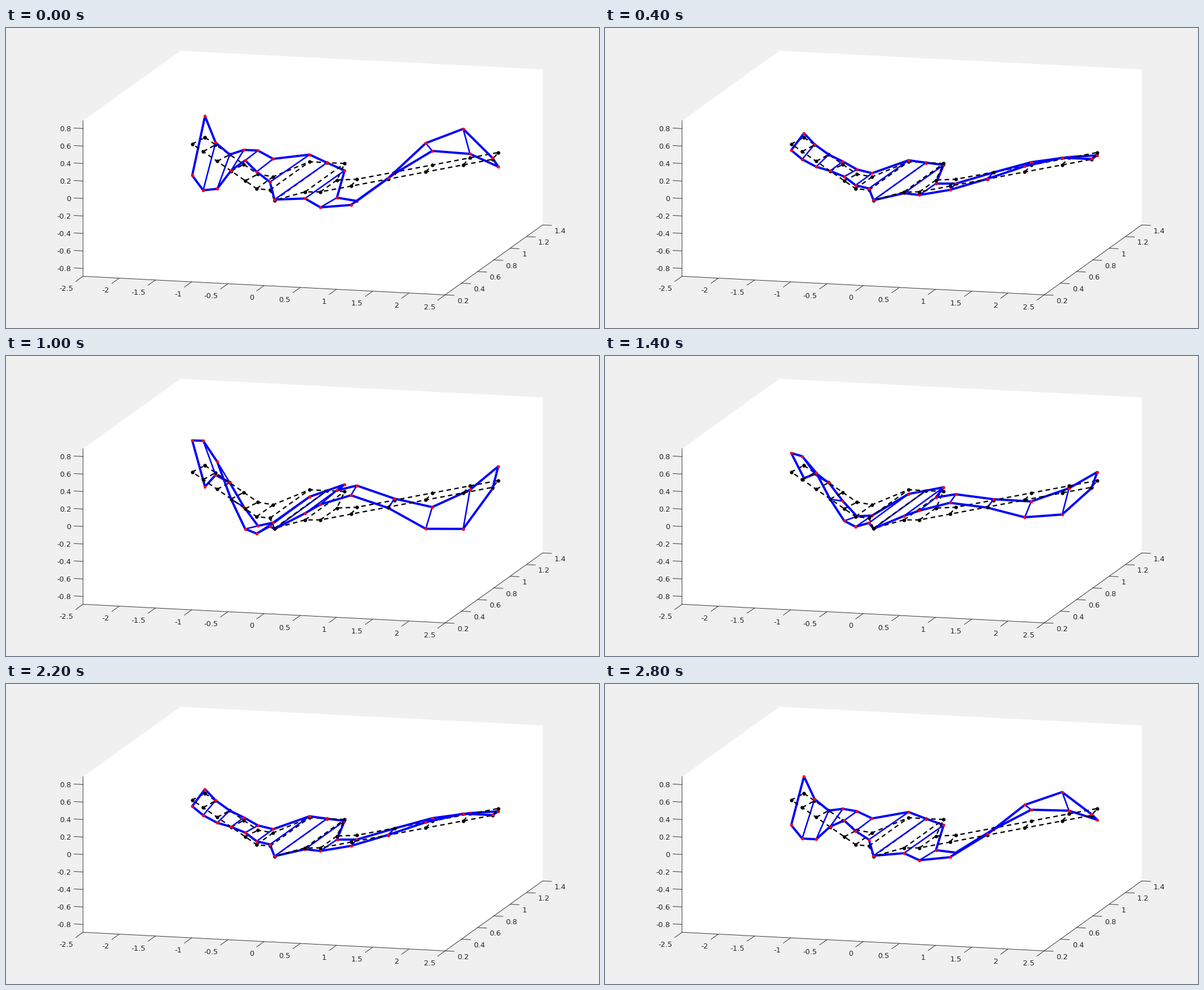
A matplotlib script for the animation above (3000 ms loop, 1053 px wide and 532 px high).

```python
import numpy as np
import matplotlib.pyplot as plt
from matplotlib.animation import FuncAnimation

W, H = 1053, 532
FRAMES, INTERVAL = 15, 200
INK = (0.15, 0.15, 0.15)
BLUE, RED = (0, 0, 1), (1, 0, 0)
BOLD, THIN, DASHED = 4.0, 2.6, 2.3
REST_Z, ABOVE = 10, 20
X_MAX, Y_MIN, Y_MAX, Z_MAX = 2.5, 0.2, 1.4, 0.89

plt.rcParams["font.family"] = "DejaVu Sans"
fig = plt.figure(figsize=(W / 72, H / 72), dpi=72, facecolor="#f0f0f0")
ax = fig.add_axes([0, 0, 1, 1])
ax.set_xlim(0, W)
ax.set_ylim(H, 0)
ax.axis("off")


def project(x, y, z=0):
    """Parallel projection of a world point to stage pixels."""
    u, v = x + X_MAX, y - Y_MIN
    return 136.8 + 128.6 * u + 144.2 * v, 302.3 + 6.6 * u - 103.3 * v - 155 * z


def draw_box():
    """White box, three axes, ticks and labels."""
    low, high = -Z_MAX, Z_MAX
    left_top, left_low = (-X_MAX, Y_MIN, high), (-X_MAX, Y_MIN, low)
    right_low, back_low = (X_MAX, Y_MIN, low), (X_MAX, Y_MAX, low)
    outline = [left_top, (-X_MAX, Y_MAX, high), (X_MAX, Y_MAX, high),
               back_low, right_low, left_low]
    ax.fill(*zip(*(project(*p) for p in outline)), color="white", lw=0, zorder=-5)
    edge = [left_top, left_low, right_low, back_low]
    ax.plot(*zip(*(project(*p) for p in edge)), color=INK, lw=0.9, zorder=-4)

    def tick(point, value, step, shift, ha):
        x, y = project(*point)
        ax.plot([x, x + step[0]], [y, y + step[1]], color=INK, lw=0.9, zorder=-4)
        ax.text(x + shift[0], y + shift[1], f"{round(value, 1) + 0:g}", ha=ha,
                va="center_baseline", size=13, color=INK, zorder=-4)

    for z in np.linspace(-0.8, 0.8, 9):
        tick((-X_MAX, Y_MIN, z), z, (-16, -0.8), (-21, -0.4), "right")
    for x in np.linspace(-X_MAX, X_MAX, 11):
        tick((x, Y_MIN, low), x, (-13, 9.3), (-17.5, 20.7), "right")
    for y in np.linspace(Y_MIN, Y_MAX, 7):
        tick((X_MAX, y, low), y, (16, 0.8), (21, 9.5), "left")


def swept_row(first, pitch, tip, sweep, body, bend, skew):
    """Nodes along one wing edge, left to right, as (screen x, screen y, drop).

    Half a span is given: the body, four evenly spaced ribs and the tip.
    The bend is mirrored with opposite sign; skew adds the uneven part.
    """
    x = np.array([0, 0.242, 0.44, *(first + pitch * np.arange(4)), tip])
    y = sweep + 0.406 * x
    y[:len(body)] = body
    drop = np.array(bend)

    def mirror(half, sign=1):
        return np.concatenate([sign * half[:0:-1], half])

    even = skew(mirror(x) / tip)
    full_x, full_y = mirror(x, -1), mirror(y)
    return np.column_stack([*project(full_x, full_y), mirror(drop, -1) + even])


NEAR = swept_row(0.73, 0.355, 2.073, 0.322, [0.328, 0.488],
                 [0, 13, 28.7, 34.7, -0.4, -50, -66.3, -29.2],
                 lambda r: 28 * r ** 14 - 1.3)
FAR = swept_row(0.682, 0.358, 2.025, 0.456, [0.974, 0.976, 0.7045],
                [0, 12.5, 31.5, 40.2, 14.2, -12.5, -1.6, 31.4],
                lambda r: -6.2 * r ** 3 - 13.5 * np.exp(-((r - 0.6) / 0.178) ** 2))


def draw_rest():
    """Undeformed wing, dashed."""
    style = dict(color="black", lw=DASHED, ls=(0, (8 / DASHED, 6 / DASHED)),
                 dash_capstyle="butt", zorder=REST_Z)
    loop = np.vstack([FAR, NEAR[::-1], FAR[:1]])
    ax.plot(loop[:, 0], loop[:, 1], **style)
    for p, q in zip(NEAR[1:-1], FAR[1:-1]):
        ax.plot([p[0], q[0]], [p[1], q[1]], **style)
    ax.plot(loop[:, 0], loop[:, 1], "o", color="black", ms=6.4, mew=0,
            zorder=REST_Z + 1)


moving = []  # (artist, resting y, drop, layer)


def add_dot(node, layer):
    art, = ax.plot(node[:1], node[1:2], "o", color=RED, ms=5.4, mew=0)
    moving.append((art, node[1:2], node[2:], layer))


def add_edge(p, q, width, layer):
    """Split an edge where its drop changes sign, so each part stays on one side of the rest plane."""
    pts = [p, q]
    if p[2] * q[2] < 0:
        pts.insert(1, p + (q - p) * p[2] / (p[2] - q[2]))
    for a, b in zip(pts, pts[1:]):
        part = np.array([a, b])
        art, = ax.plot(part[:, 0], part[:, 1], color=BLUE, lw=width,
                       solid_capstyle="round")
        moving.append((art, part[:, 1], part[:, 2], layer))


def build_wing():
    last = len(FAR) - 1
    for i in range(last):
        add_edge(FAR[i], FAR[i + 1], BOLD, 1)
        add_edge(NEAR[i], NEAR[i + 1], BOLD, 4)
    for i in range(last + 1):
        add_edge(NEAR[i], FAR[i], BOLD if i in (0, last) else THIN, 2)
        add_dot(FAR[i], 3)
        add_dot(NEAR[i], 5)


def swing(k):
    """Fast linear fall from 1 to -1, then a rise at half the speed."""
    return 1 - 0.4 * k if k <= 5 else -1 + 0.2 * (k - 5)


def update(k):
    s = round(swing(k % FRAMES), 6)
    for art, rest, drop, layer in moving:
        shift = s * drop
        art.set_ydata(rest + shift)
        art.set_zorder(layer + (ABOVE if shift.mean() < 0 else 0))
    return [m[0] for m in moving]


draw_box()
draw_rest()
build_wing()
anim = FuncAnimation(fig, update, frames=FRAMES, interval=INTERVAL,
                     repeat=True, repeat_delay=0, blit=False)
plt.show()
```
